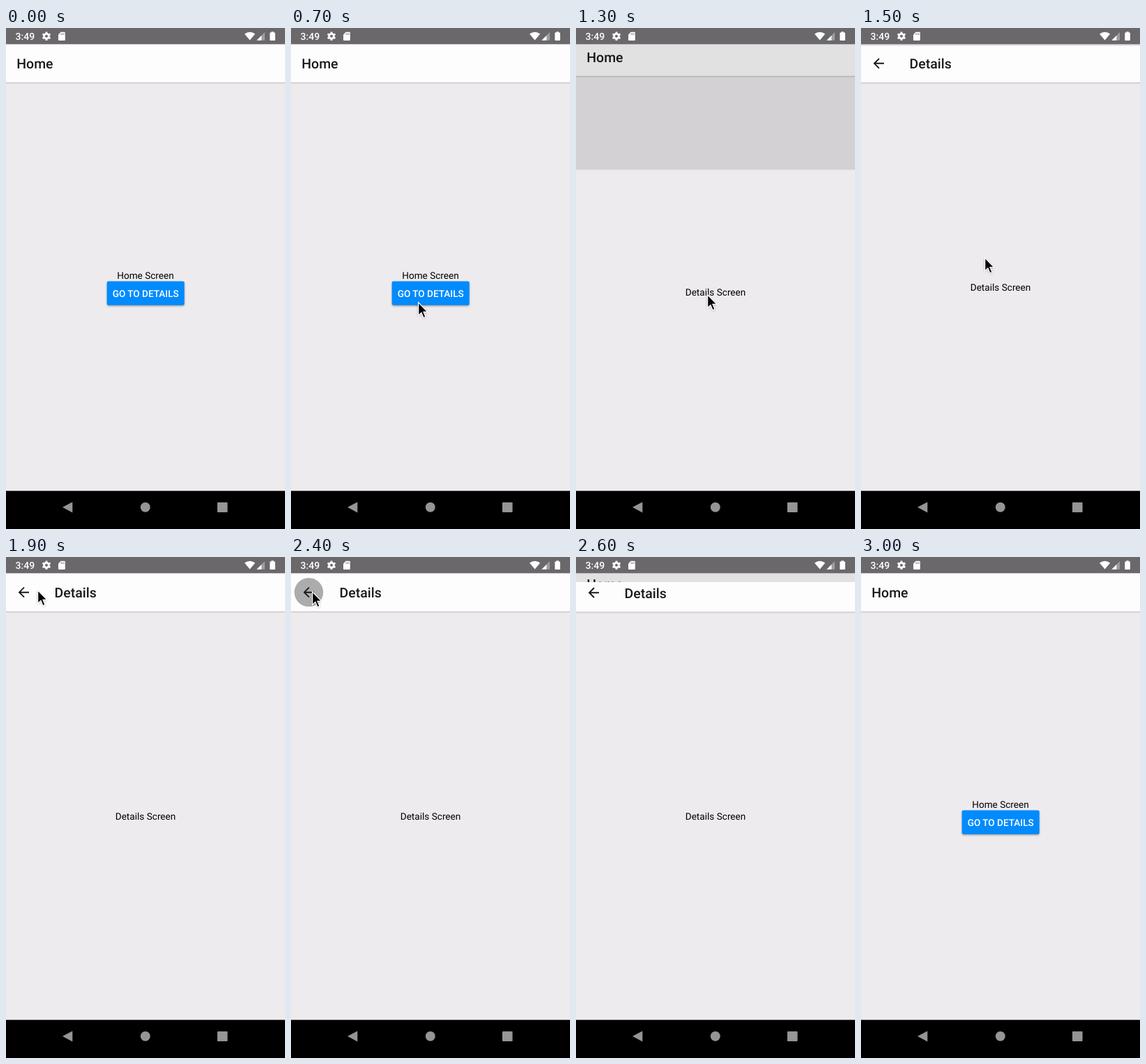
These frames come from a looping animation (400 by 719 pixels, 3.1 s). An HTML page:

```html
<!DOCTYPE html>
<html lang="en">
<head>
<meta charset="utf-8">
<title>Stack navigation</title>
<style>
  html, body { margin: 0; width: 100%; height: 100%; overflow: hidden; background: #000; }
  svg { display: block; width: 400px; height: 719px; }
  text { font-family: Roboto, sans-serif; font-size: 13.6px; text-rendering: geometricPrecision; }
  .title { font-size: 19.45px; font-weight: 500; fill: #1a181b; }
  .mid { text-anchor: middle; }
</style>
</head>
<body>
<svg viewBox="0 0 400 719">
  <defs>
    <linearGradient id="fade" x2="0" y2="1">
      <stop offset="0" stop-opacity=".17"/>
      <stop offset="1" stop-opacity="0"/>
    </linearGradient>
    <filter id="blur" x="-20%" y="-40%" width="140%" height="180%"><feGaussianBlur stdDeviation="1.6"/></filter>
    <clipPath id="cardClip"><rect id="cardWindow" y="23" width="400" height="642"/></clipPath>
    <clipPath id="buttonClip"><rect x="144.7" y="363.4" width="111" height="34.4" rx="2"/></clipPath>
    <g id="page">
      <rect width="400" height="719" fill="#edebee"/>
      <rect y="77.8" width="400" height="3" fill="url(#fade)"/>
      <rect width="400" height="77.8" fill="#fefdfe"/>
    </g>
  </defs>

  <g id="home">
    <use href="#page"/>
    <text class="title" x="15.3" y="58.3">Home</text>
    <text class="mid" x="200" y="359.6">Home Screen</text>
    <rect id="lift" x="145" y="365" width="110.5" height="34" rx="2" filter="url(#blur)" opacity=".38"/>
    <rect x="144.7" y="363.4" width="111" height="34.4" rx="2" fill="#028bfc"/>
    <circle id="buttonRipple" cx="185" cy="388" clip-path="url(#buttonClip)" opacity=".12"/>
    <text class="mid" x="200.2" y="386.2" font-weight="500" fill="#fff">GO TO DETAILS</text>
  </g>
  <rect id="dim" y="23" width="400" height="642"/>

  <g id="cardBox" clip-path="url(#cardClip)">
    <g id="card">
      <use href="#page"/>
      <circle id="backRipple" cx="25.5" cy="50.6"/>
      <path d="M33 50.7H19.5M26 43.7L19 50.7L26 57.7" fill="none" stroke="#1a181b" stroke-width="1.9"/>
      <text class="title" x="69.6" y="58.3">Details</text>
      <text class="mid" x="200" y="376.8">Details Screen</text>
    </g>
  </g>

  <rect width="400" height="23.3" fill="#6a686b"/>
  <g fill="#fff">
    <text x="13.6" y="17" font-weight="500" style="font-size:14px">3:49</text>
    <g transform="translate(58 11.8)">
      <circle r="3.4" fill="none" stroke="#fff" stroke-width="2.8"/>
      <path id="teeth" fill="none" stroke="#fff" stroke-width="2.7"/>
    </g>
    <path d="M78.6 5.8H83.6Q84.8 5.8 84.8 7V16.8Q84.8 18 83.6 18H76.2Q75 18 75 16.8V9.4Z"/>
    <path d="M79 7.6v2.2M81 7.6v2.2M83 7.6v2.2" stroke="#6a686b" stroke-width=".9"/>
    <path d="M342 8.6Q349.6 2.8 357.2 8.6L349.6 17.6Z"/>
    <path d="M371 6V17.8H359.4Z" opacity=".35"/>
    <path d="M366.4 10.7V17.8H359.4Z"/>
    <path d="M380.4 5.2h3.4v1.3h1.3q.8 0 .8.8v9.9q0 .8-.8.8h-6q-.8 0-.8-.8V7.3q0-.8.8-.8h1.3z"/>
  </g>

  <rect y="664.3" width="400" height="55"/>
  <g fill="#969496">
    <path d="M81 687.8L95.3 680.2V695.4Z"/>
    <circle cx="199.8" cy="687.8" r="7"/>
    <rect x="303" y="680.7" width="14.6" height="14.4" rx="1"/>
  </g>

  <g id="cursor">
    <path d="M0 1V21L4.8 16.5L8 24L11.6 22.5L8.5 15.2H14.5Z" opacity=".3" filter="url(#blur)"/>
    <path d="M.6 .8V19.6L4.9 15.5L8 22.9L11 21.6L8 14.4H13.8Z" stroke="#fff" stroke-width="1.3"/>
  </g>
</svg>
<script>
const STEP = 100, STEPS = 31;
const TOP = 23.3, HEIGHT = 641;

// [step, x, y] of the pointer tip
const pointer = [
  [1, 53, 583], [3, 158, 452], [4, 229, 377], [5, 202, 392], [6, 184, 401],
  [7, 182, 393], [11, 184, 390], [12, 186, 387], [13, 188, 382], [15, 177, 329],
  [16, 134, 205], [17, 94, 96], [18, 71, 50], [19, 45, 47], [20, 32, 49],
  [24, 30, 49], [25, 17, -3]
];
// Share of the details card still hidden, by step
const hidden = { 13: .281, 14: .05, 15: .004, 25: .49, 26: .02 };
// [radius, opacity] by step
const buttonPress = { 11: [34, .12], 12: [90, .12] };
const backPress = { 23: [14, .22], 24: [20.7, .32] };

const $ = id => document.getElementById(id);
const set = (id, attrs) => {
  for (const key in attrs) $(id).setAttribute(key, attrs[key]);
};
const shift = (id, x, y) => set(id, { transform: `translate(${x} ${y})` });

let teeth = '';
for (let i = 0; i < 6; i++) {
  const a = i * Math.PI / 3 + Math.PI / 6, c = Math.cos(a), s = Math.sin(a);
  teeth += `M${3.6 * c} ${3.6 * s}L${6.3 * c} ${6.3 * s}`;
}
set('teeth', { d: teeth });

function tipAt(step) {
  const next = pointer.findIndex(p => p[0] >= step);
  if (next < 0 || step < pointer[0][0]) return null;
  const b = pointer[next], a = pointer[next - 1] || b;
  const k = a === b ? 1 : (step - a[0]) / (b[0] - a[0]);
  return [a[1] + (b[1] - a[1]) * k, a[2] + (b[2] - a[2]) * k];
}

function ripple(id, state) {
  const [r, opacity] = state || [0, 0];
  set(id, { r, opacity });
}

function render(step) {
  const rest = hidden[step] ?? (step > 12 && step < 25 ? 0 : 1);
  const shown = 1 - rest;

  shift('home', 0, -.02 * HEIGHT * shown);
  set('dim', { opacity: .11 * Math.min(1, shown / .36) });
  set('cardBox', { visibility: shown ? 'visible' : 'hidden' });
  set('cardWindow', { y: TOP + HEIGHT * rest });
  shift('card', 0, .041 * HEIGHT * rest);

  ripple('buttonRipple', buttonPress[step]);
  ripple('backRipple', backPress[step]);
  shift('lift', 0, buttonPress[step] ? 2 : 0);

  const tip = tipAt(step);
  set('cursor', { visibility: tip ? 'visible' : 'hidden' });
  if (tip) shift('cursor', ...tip);
}

const start = performance.now();
let last = -1;
function tick() {
  const step = Math.floor((performance.now() - start) / STEP) % STEPS;
  if (step !== last) render(last = step);
  requestAnimationFrame(tick);
}
tick();
</script>
</body>
</html>
```
